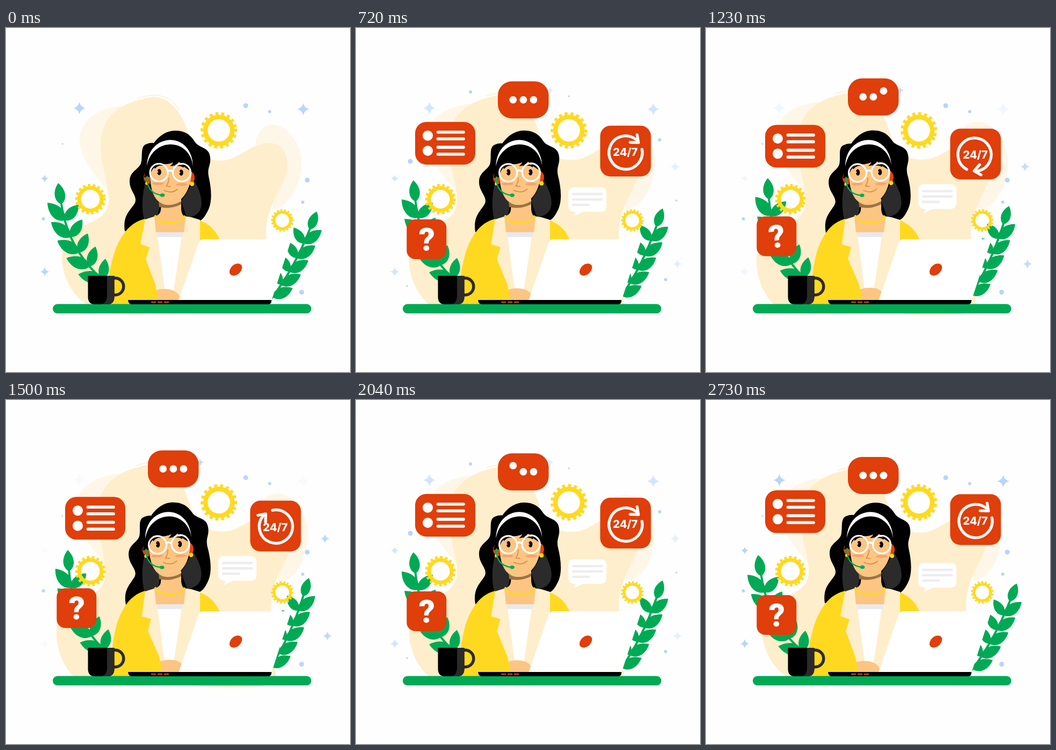
These frames come from a looping animation (640x640 px, 2.76 s). An HTML page:

```html
<!DOCTYPE html>
<html lang="en">
<head>
<meta charset="utf-8">
<title>Customer support</title>
<style>
  html, body { margin: 0; width: 100%; height: 100%; overflow: hidden; background: #fefefe; }
  svg { display: block; width: 100vw; height: 100vh; }
  text { fill: #fff; text-anchor: middle; }
  .line { fill: none; stroke-linecap: round; stroke-linejoin: round; }
  .card > rect { fill: #e03e0a; }
  .white { fill: #fff; }
  .skin { fill: #fcc582; }
  .cream { fill: #feeecb; }
  .pale { fill: #fef7e7; }
  .yellow { fill: #ffd91f; }
  .green { fill: #00aa55; }
  .spark { fill: #b9d4fd; stroke: #b9d4fd; stroke-linecap: round; }
  .spark use { stroke: none; }
</style>
</head>
<body>
<svg viewBox="0 0 640 640">
  <defs><path id="star" d="M0 -1Q.17 -.17 1 0Q.17 .17 0 1Q-.17 .17 -1 0Q-.17 -.17 0 -1Z"/></defs>

  <g id="backdrop">
    <path class="pale" d="M216 145C165 150 137 175 137 210C139 250 170 275 190 305L240 220Z"/>
    <path class="pale" d="M464 218C466 190 480 180 498 180C525 182 548 215 550 245C550 290 530 332 497 336L488 260Z"/>
    <path class="cream" d="M150 514C122 497 104 460 104 425C104 390 122 378 150 365C185 352 195 335 190 305C186 275 176 250 176 215C177 170 205 138 275 128C308 130 322 158 333 178C345 215 358 247 396 248C430 248 455 214 490 214C522 214 528 250 520 275C512 300 484 335 484 380C484 430 492 470 494 514C470 521 370 522 330 514Z"/>
    <path class="line" stroke="#feeecb" stroke-width="1.5" d="M245 131C275 120 305 123 321 151M375 244Q405 253 440 238"/>
  </g>

  <g id="starsA" class="spark"></g>
  <g id="starsB" class="spark"></g>
  <g id="dotsA" class="spark">
    <path stroke-width="9" d="M446 144.500h0M560.500 283h0M550 491.500h0"/>
    <path stroke-width="6" d="M490.500 155.500h0M552 324h0M69.500 355h0"/>
    <path stroke-width="3" d="M105 215.500h0"/>
  </g>
  <g id="dotsB" class="spark">
    <path stroke-width="9" d="M101 248h0"/>
    <path stroke-width="6" d="M213 119h0M565 208h0M576 468h0"/>
    <path stroke-width="3.500" d="M396 127h0M596 321h0M95 480h0"/>
  </g>

  <g id="plantLeft" class="green"></g>
  <g id="plantRight" class="green"></g>
  <g id="gears"></g>

  <g id="hair">
    <path d="M275 214C285 200 300 190 317 191C338 192 346 203 353 214C362 224 379 222 380 242C381 256 374 260 377 276C382 298 385 325 374 343C369 352 365 359 352 362L270 378H221C217 350 229 342 239 327C247 313 229 304 230 284C231 266 246 264 251 252C255 240 249 220 261 216Q268 213 275 214Z"/>
    <path fill="#2b2b2b" d="M260 286C254 305 251 335 257 356L281 352L288 325ZM350 284C360 300 366 320 363 333C360 345 352 351 336 353L326 322Z"/>
  </g>

  <path class="yellow" d="M338 353C365 355 389 370 397 394L360 440L330 450Z"/>
  <path class="cream" d="M256 357L278 350L331 350L345 352L361 357V400L321 507H270L250 402Z"/>
  <path class="white" d="M281 380H328L312 489L295 487Z"/>
  <path fill="#e9e9ee" d="M279 379H331L328 389H282Z"/>
  <path class="skin" d="M290 318H326V338Q327 349 334 352L331 380H279L276 351Q288 347 288 338Z"/>
  <path fill="#9b7345" d="M284 323Q303 336 326 322V328Q306 338 285 333Z"/>
  <g class="line" stroke="#ffd91f">
    <path stroke-width="4" stroke-dasharray="0.1 4" d="M278 350C283 366 326 366 332 350"/>
    <path stroke-width="2.400" d="M278 350C283 366 326 366 332 350"/>
  </g>

  <g id="arm">
    <path class="skin" d="M277 489Q286 484 302 486Q318 488 323 500L320 509H270Z"/>
    <path class="yellow" d="M259 355C233 361 219 379 207 404C196 428 189 470 184 518H282V500L278 478L260 430L267 408L250 402Z"/>
  </g>

  <g id="head">
    <path fill="#e5420d" d="M268 264Q256 268 256 279Q257 288 268 290ZM343 266Q352 270 351 281Q349 290 342 290Z"/>
    <circle class="yellow" cx="262" cy="289" r="3"/>
    <circle class="yellow" cx="346" cy="290" r="4"/>
    <path class="skin" d="M268 260C267 298 274 318 289 326C305 335 329 325 340 296C346 280 346 263 345 248L275 244Z"/>
    <path d="M262 257C272 204 342 204 348 258L349 270C339 263 328 257 322 249Q316 257 305 257Q310 253 311 250C295 257 287 250 281 255Q270 262 267 277L257 278Z"/>
    <path class="white" d="M262 257C264 194 346 190 348 258C342 203 272 203 262 257Z"/>
    <path class="line" stroke="#000" stroke-width="2.500" d="M277 260Q284 253 292 255M314 257Q322 253 330 258"/>
    <g fill="#f5a56f">
      <ellipse cx="283" cy="289.500" rx="11" ry="2.800"/>
      <ellipse cx="327" cy="291" rx="11" ry="2.800"/>
    </g>
    <ellipse cx="285" cy="268" rx="3.700" ry="5.800"/>
    <ellipse cx="326" cy="269" rx="3.700" ry="5.800"/>
    <path class="skin" d="M284 268L280 264V270ZM325 269L321 265V271Z"/>
    <g class="line" stroke="#fff" stroke-width="3.200">
      <circle cx="284.500" cy="269" r="16.500"/>
      <circle cx="327" cy="269" r="16.500"/>
      <path d="M301 267Q305 263 310 267"/>
    </g>
    <path class="line" stroke="#d98a4c" stroke-width="1.700" d="M303 279Q303 288 298 294L306 295M294 302Q309 309 319 300"/>
    <path class="line" stroke="#00aa55" stroke-width="2.300" d="M262 277C262 298 271 309 290 311"/>
    <ellipse class="green" cx="291" cy="311" rx="4.300" ry="3.200"/>
    <ellipse class="green" cx="263" cy="281" rx="1.800" ry="6"/>
  </g>

  <path class="white" d="M367 393H524Q531 393 529 399L494 507H321L358 400Q361 393 367 393Z"/>
  <ellipse cx="427.500" cy="449.500" rx="13.300" ry="9.300" fill="#e03e0a" transform="rotate(-42 427.500 449.500)"/>
  <rect class="green" x="87" y="513.500" width="481" height="17.500" rx="8.750"/>
  <path d="M227 506H494Q494 514 488 514H234Q228 514 227 506Z"/>
  <path stroke="#e03e0a" stroke-width="2.600" d="M270 510H279M282 510H291M294 510H303"/>
  <circle cx="203" cy="481" r="15.800" fill="none" stroke="#2b2b2b" stroke-width="5.500"/>
  <path d="M152.500 461H201.500V501Q201 514 189 514H165Q153 514 152.500 501Z"/>
  <path fill="#2b2b2b" d="M188 461H201.500V501Q201 514 189 514H178Q187 512 188 500Z"/>

  <g id="listCard" class="card">
    <rect x="110" y="168" width="112" height="79.500" rx="21"/>
    <circle class="white" cx="133.500" cy="193.500" r="9.500"/>
    <circle class="white" cx="133.500" cy="221.700" r="9.500"/>
    <path class="line" stroke="#fff" stroke-width="5.600" d="M152.500 187H200M152.500 199.500H200M152.500 215.200H200M152.500 228H200"/>
  </g>
  <g id="dotsCard" class="card">
    <rect x="264" y="106" width="94.500" height="69" rx="26"/>
    <g id="typing" class="white">
      <circle cx="292.200" cy="140.300" r="6.900"/>
      <circle cx="311.300" cy="140.300" r="6.900"/>
      <circle cx="330.400" cy="140.300" r="6.900"/>
    </g>
  </g>
  <g id="hoursCard" class="card">
    <rect x="454.300" y="175.300" width="94.400" height="94.400" rx="19"/>
    <g id="arrow" class="line" stroke="#fff" stroke-width="5.200">
      <path d="M532 219A31 31 0 1 1 521 201"/>
      <path d="M523 192L525.500 206.500L510 206"/>
    </g>
    <text x="501" y="231.500" font-family="Inter, sans-serif" font-size="20" font-weight="800">24/7</text>
  </g>
  <g id="askCard" class="card">
    <rect x="94.300" y="363" width="74" height="74" rx="16"/>
    <text id="ask" x="131.800" y="421" font-family="Roboto, sans-serif" font-size="59" font-weight="900">?</text>
  </g>
  <g id="noteCard">
    <path class="white" d="M406 303H455Q466 303 466 314V338Q466 349 455 349H423L405 357L409 349.500Q395 349 395 338V314Q395 303 406 303Z"/>
    <path class="line" stroke="#ededef" stroke-width="4.500" d="M404 316H457M404 326H457M404 336H433"/>
  </g>
</svg>
<script>
const LOOP = 2760, STEP = 30, TAU = Math.PI * 2;
const $ = id => document.getElementById(id);
const set = (id, name, value) => $(id).setAttribute(name, value);
const clamp = v => Math.max(0, Math.min(1, v));
const smooth = v => { v = clamp(v); return v * v * (3 - 2 * v); };
const spin = (id, angle, x, y) => set(id, 'transform', `rotate(${angle} ${x} ${y})`);

// Scales one shape so that its middle sits at x, y.
const place = (x, y, size, angle, shape) =>
  `<g transform="translate(${x} ${y}) rotate(${angle}) scale(${size})">${shape}</g>`;

// Leaf pointing right: unit length, base at 0,0.
const LEAF = '<path d="M0 0C.2 .33 .65 .32 1 0C.65 -.32 .2 -.33 0 0Z"/>';

// Leaf pairs at even steps up a quadratic stem; side mirrors the plant.
function plant(base, bend, top, side, size) {
  const mix = (a, b, u) => a + (b - a) * u;
  const point = u => [0, 1].map(k => mix(mix(base[k], bend[k], u), mix(bend[k], top[k], u), u));
  const heading = u => {
    const [dx, dy] = [0, 1].map(k => mix(bend[k] - base[k], top[k] - bend[k], u));
    return Math.atan2(dy, dx) * 360 / TAU;
  };
  let svg = `<path class="line" stroke="#00aa55" stroke-width="4" d="M${base}Q${bend} ${top}"/>`;
  for (let u = .02; u < 1; u += .2) {
    svg += place(...point(u), 46 * size, heading(u) - 29 * side, LEAF);
    svg += place(...point(u), 39 * size, heading(u) + 57 * side, LEAF);
  }
  return svg + place(...top, 40 * size, heading(1), LEAF);
}
$('plantLeft').innerHTML = plant([182, 470], [116, 414], [103, 328], 1, 1);
$('plantRight').innerHTML = plant([494, 503], [536, 448], [565, 375], -1, .9);

const star = (x, y, r) => place(x, y, r, 0, '<use href="#star"/>');
$('starsA').innerHTML = star(136.5, 149, 11.5) + star(553, 151, 11.5) + star(72, 280, 7) + star(72, 453.5, 8.5);
$('starsB').innerHTML = star(361, 116, 7) + star(593.5, 258, 8.5) + star(598, 439, 8.5);

// The teeth are a dashed ring around a plain one.
const TEETH = 16, PITCH = 360 / TEETH;
const GEAR = `<g class="wheel" fill="none" stroke="#ffd91f">
  <circle r=".735" stroke-width=".25"/>
  <circle r=".92" stroke-width=".16" pathLength="${TEETH * 2}" stroke-dasharray="1" transform="rotate(${-PITCH / 4})"/></g>`;
$('gears').innerHTML = place(396, 190.5, 34, 0, GEAR) + place(157, 318.5, 28.5, 0, GEAR) + place(514, 358, 21, 0, GEAR);
const wheels = document.querySelectorAll('.wheel');

// Pop origin, vertical drift and start time of each card.
const cards = [
  { id: 'noteCard', x: 405, y: 357, drift: -13, start: 150 },
  { id: 'hoursCard', x: 454.3, y: 269.7, drift: 12.3, start: 200 },
  { id: 'dotsCard', x: 311.3, y: 175, drift: -12.5, start: 240 },
  { id: 'listCard', x: 222, y: 247.5, drift: 12.5, start: 243 },
  { id: 'askCard', x: 168.3, y: 363, drift: -13, start: 282 }
];
const POP = 300, HOP = 240, HOP_DELAY = 146, HOP_STARTS = [840, 1925];

const hop = t => HOP_STARTS.reduce((sum, start) => sum + 11.5 * Math.sin(Math.PI * clamp((t - start) / HOP)), 0);
const blink = phase => clamp(.5 + .6 * Math.cos(TAU * phase));

function draw(t) {
  const sway = (1 - Math.cos(TAU * t / LOOP)) / 2;

  set('backdrop', 'transform',
    `translate(310 280) scale(${1 + .05 * sway} ${1 + .06 * sway}) translate(-310 -280)`);
  spin('plantLeft', 5 * sway, 215, 492);
  spin('plantRight', -4.3 * sway, 430, 535);
  spin('hair', -2.4 * sway, 300, 330);
  spin('head', -2.4 * sway, 300, 330);
  spin('arm', -3.2 * sway, 259, 355);

  const starPhase = t / LOOP * 3, dotPhase = t / LOOP * 2 + .02;
  set('starsA', 'opacity', blink(starPhase));
  set('starsB', 'opacity', blink(starPhase + .5));
  set('dotsA', 'opacity', blink(dotPhase));
  set('dotsB', 'opacity', blink(dotPhase + .5));

  wheels.forEach(wheel => wheel.setAttribute('transform', `rotate(${3 * PITCH * t / LOOP})`));

  for (const { id, x, y, drift, start } of cards) {
    const scale = smooth((t - start) / POP);
    set(id, 'transform', `translate(${x} ${y + drift * sway}) scale(${scale}) translate(${-x} ${-y})`);
    set(id, 'visibility', scale ? 'visible' : 'hidden');
  }
  [...$('typing').children].forEach((dot, i) =>
    dot.setAttribute('transform', `translate(0 ${-hop(t - i * HOP_DELAY)})`));
  spin('arrow', 360 * clamp((t - 980) / 695), 501, 224);
  spin('ask', 10 * Math.sin(TAU * clamp((t - 850) / 440)), 131.8, 400);
}

function tick() {
  draw(Math.floor(performance.now() % LOOP / STEP) * STEP);
  requestAnimationFrame(tick);
}
tick();
</script>
</body>
</html>
```
